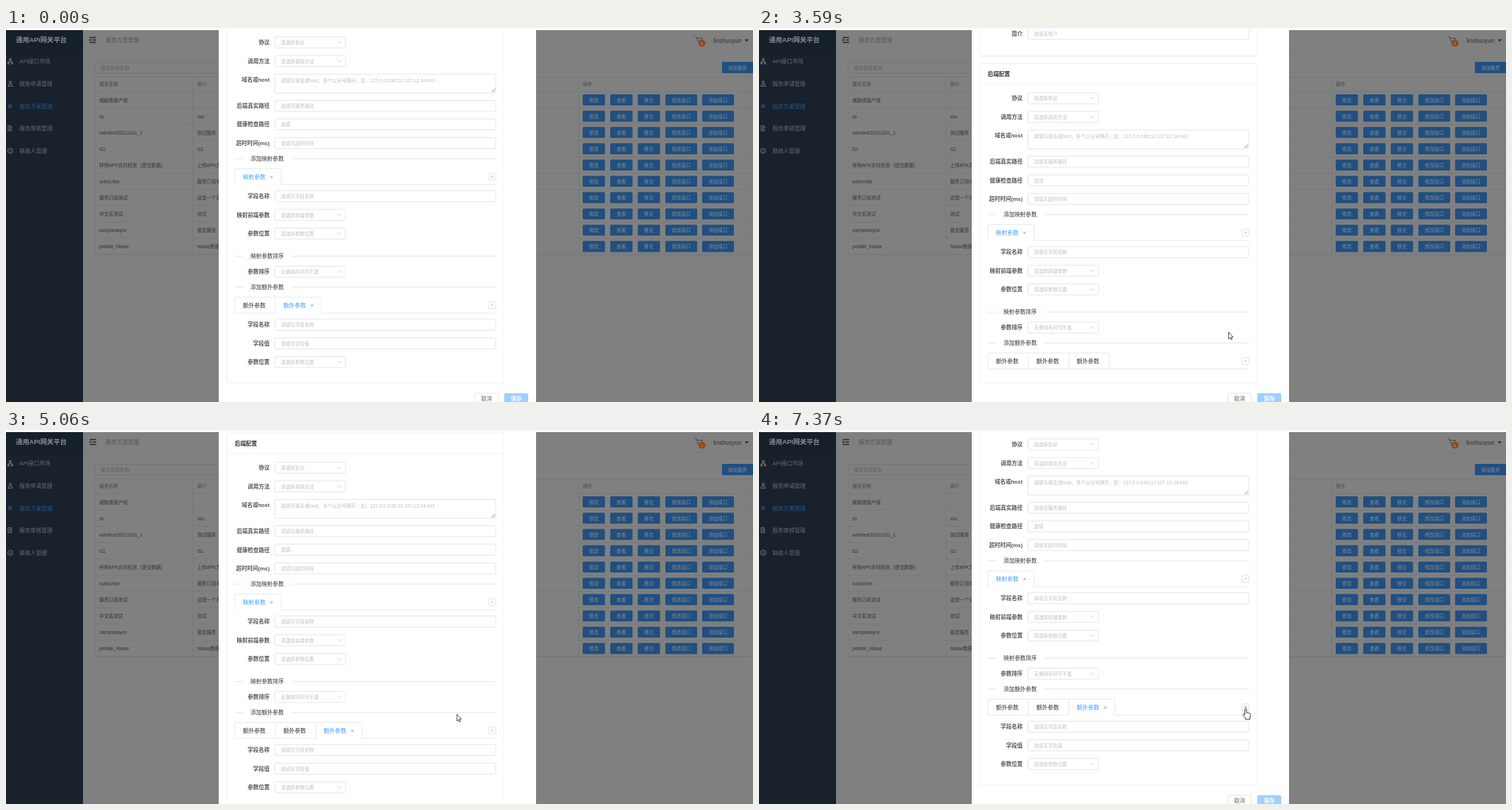
These frames come from a looping animation (1057x530 px, 8 s). An HTML page:

```html
<!DOCTYPE html>
<html lang="zh-CN">
<head>
<meta charset="utf-8">
<style>
html, body { margin: 0; width: 100%; height: 100%; overflow: hidden; background: #808080; }
svg { display: block; font-family: "Liberation Sans", "Noto Sans CJK SC", "Noto Sans CJK", sans-serif; }
</style>
</head>
<body>
<svg id="stage" width="1057" height="530" viewBox="0 0 1057 530"></svg>
<script>
const PANEL = 79.2, LOOP = 8000;
const ADD_AT = 2455, HOVER_AT = 4170, PICK_AT = 4345;
const BLUE = '#409eff', LINE = '#e4e7ed', HINT = '#b9bdc6', DIM = '#808080', DIMBLUE = '#204f80';

const rect = (x, y, w, h, fill, stroke = 'none', r = 0) =>
  `<rect x="${x}" y="${y}" width="${w}" height="${h}" rx="${r}" fill="${fill}" stroke="${stroke}" stroke-width=".8"/>`;
const text = (x, y, s, size, fill, more = '') =>
  `<text x="${x}" y="${y + size * .37}" font-size="${size}" fill="${fill}" ${more}>${s}</text>`;
const path = (d, stroke, width = .8, fill = 'none') =>
  `<path d="${d}" fill="${fill}" stroke="${stroke}" stroke-width="${width}"/>`;
const BOLD = 'font-weight="700"', MID = 'text-anchor="middle"', END = 'text-anchor="end"';

// Dimmed page behind the dialog
function sidebar() {
  const names = ['API接口市场', '服务申请管理', '服务方案管理', '服务审核管理', '联络人管理'];
  const icons = [
    'M6 44.5v2.5M3.5 50v-2.5h5V50M4.8 43.5h2.4v2H4.8zM2.5 49h2v2h-2zM7.500 49h2v2h-2z',
    'M4.500 77a1.600 1.600 0 1 0 3.200 0a1.600 1.600 0 1 0-3.200 0M3 82.500q0-3 3-3t3 3z',
    'M4 114v-5h3M5 112.500l3.500-3.500M8.500 112h-2',
    'M3 138.500h4v7H3zM4 141h2M4 143h2M8 140v2M8 144v1.500',
    'M6 170.300l3.300 1.800v3.600L6 177.500l-3.300-1.800v-3.600zM4.500 174h3'
  ];
  return rect(0, 3, 109, 527, '#18212c') + rect(0, 3, 109, 29, '#16202a') +
    text(50, 17, '通用API网关平台', 9.4, '#8b8d8f', BOLD + MID) +
    names.map((s, i) => {
      const c = i == 2 ? '#22588f' : '#666d75';
      return path(icons[i], c, 1.1) + text(19, 47.5 + i * 31.6, s, 7.8, c);
    }).join('');
}

function table() {
  const rows = [
    ['服务名称', '简介'], ['威胁情报产线', ''], ['ss', 'sss'], ['wdmtest20211101_1', '测试服务'],
    ['t11', 't11'], ['样例APK实时检测（提交数据）', '上传APK文件'], ['subscribe', '服务订阅中心'],
    ['服务订阅测试', '这是一个测试'], ['中文名测试', '测试'], ['sampleasync', '鉴定服务'], ['pebble_hbase', 'hbase数据']
  ];
  const buttons = [[816, 31.5, '修改'], [855, 31.5, '查看'], [894, 31.5, '移交'], [933, 45, '修改接口'], [985, 45, '添加接口']];
  let out = rect(126, 69.500, 929, 251.500, 'none', '#757679') + path('M264.500 69.500V321M810.500 69.500V321', '#757679') +
    text(816, 79.500, '操作', 6.700, '#484a4c');
  rows.forEach((row, i) => {
    const y = i ? 79 + i * 23.080 : 79.500;
    row.forEach((s, k) => out += text(k ? 270.500 : 132, y, s, 6.700, i ? '#303133' : '#404245'));
    out += path(`M126 ${90.300 + i * 23.080}H1055`, '#757679');
    if (i) for (const [x, w, s] of buttons)
      out += rect(x, y - 8, w, 15.600, DIMBLUE, 'none', 1.500) + text(x + w / 2, y, s, 6.700, '#8a8c8f', MID);
  });
  return out;
}

const page = rect(0, 0, 1057, 530, DIM) + sidebar() +
  path('M109 32.400H1057', '#78797b') +
  path('M118.500 13.500h9M122.500 17h5M118.500 20.500h9M120.500 15.500l-2 1.500 2 1.500', '#262626', 1.300) +
  text(141, 17.500, '服务方案管理', 7.900, '#4b545f') +
  path('M975 12.500h2l1.800 6.500h5l1.500-4.500h-7', '#3d3f42', .9) +
  '<circle cx="984.700" cy="21.500" r="5" fill="#944717"/>' + text(984.700, 21.800, '1', 6, '#aaa', MID) +
  text(1001, 17.500, 'linshuoyun', 8.300, '#303133') + path('M1045 16h6l-3 3.500z', 'none', 0, '#303133') +
  rect(126, 49, 190, 15, 'none', '#6e7073', 2) + text(134, 56.500, '服务名称查询', 6.700, '#5c5e62') +
  rect(1013, 48, 50, 16, DIMBLUE, 'none', 1.500) + text(1035, 56.300, '添加服务', 6.700, '#8a8c8f', MID) +
  table();

// Form parts
const label = (y, s) => text(373, y, s, 7.750, '#54565a', BOLD + END);
function field(y, name, hint, select) {
  return label(y, name) + rect(380.300, y - 7.800, select ? 100.300 : 312.700, 15.600, '#fff', '#dcdfe6', 2) +
    text(389, y + .3, hint, 6.700, HINT) +
    (select ? path(`M468.800 ${y - 1.300}l2.700 2.700 2.700-2.700`, '#c0c4cc') : '');
}
const divider = (y, s) => path(`M324 ${y}h11.500M404.500 ${y}H693`, '#dcdfe6') + text(346, y, s, 7.850, '#303133');
const plus = (y, c) => rect(683.400, y - 5, 9.800, 9.800, 'none', '#d3dce6', 1.500) +
  path(`M686 ${y}h4.600M688.300 ${y - 2.300}v4.600`, c, .7);

const form = rect(312.500, -60, 392, 98.700, '#fff', '#ebeef5', 2) +
  [1, 2, 3].map(i => path(`M313 ${38.700 + i}H704`, `rgba(0,0,0,${.06 - i * .015})`, 1)).join('') +
  field(8.300, '简介', '请填写简介') +
  text(323.500, 65.300, '后端配置', 7.900, '#303133', BOLD) + path('M313 80H704', '#ebeef5') +
  field(99.600, '协议', '请选择协议', 1) + field(126, '调用方法', '请选择调用方法', 1) +
  label(152.600, '域名或host') + rect(380.300, 144.600, 312.700, 26.800, '#fff', '#dcdfe6', 2) +
  text(389, 153.300, '请填写域名或host，多个以分号隔开，如：127.0.0.0:80;10.107.12.34:443', 6.700, HINT) +
  path('M687 170l5-5M689.500 170l2.500-2.500', '#777', .7) +
  field(189.400, '后端真实路径', '请填写服务路径') + field(215.800, '健康检查路径', '选填') +
  field(242.300, '超时时间(ms)', '请填写超时时间') + divider(264.400, '添加映射参数') +
  plus(290, '#c3cbd5') + field(317.600, '字段名称', '请填写字段名称') +
  field(344, '映射前端参数', '请选择前端参数', 1) + field(370.500, '参数位置', '请选择参数位置', 1) +
  divider(402.500, '映射参数排序') + field(424.500, '参数排序', '无需排序时可不选', 1) + divider(446.300, '添加额外参数');

const panel = field(499.700, '字段名称', '请填写字段名称') + field(526.100, '字段值', '请填写字段值') +
  field(552.600, '参数位置', '请选择参数位置', 1);

const footer = path('M312.500 495V503H704.500V495', '#ebeef5') +
  rect(663.500, 517.700, 33, 18, '#fff', '#dcdfe6', 2) + text(680, 525.500, '取消', 7.800, '#606266', MID) +
  rect(705, 517.500, 34, 18, '#a0cfff', 'none', 2) + text(722, 525.500, '保存', 7.800, '#fff', BOLD + MID);

// Each tab: [active 0..1, hovered 0..1]
function tabs(y, name, states) {
  const top = y - 11.500, base = y + 11.200;
  let x = 324, marks = '', edges = '', line = `M324 ${base}`;
  for (const [active, hover] of states) {
    const open = Math.max(active, hover), w = 57.200 + 7.900 * active;
    const tx = x + 11.200 - 3.850 * hover * (1 - active), cx = tx + 34.500 + 2.750 + 3.300 * open;
    const r = 1.600 * open;
    const mix = [48, 49, 51].map((v, i) => Math.round(v + ([64, 158, 255][i] - v) * open));
    marks += text(tx, y + .2, name, 8, `rgb(${mix})`);
    if (open > .05) marks += path(`M${cx - r} ${y - r + .5}l${2 * r} ${2 * r}m0 ${-2 * r}l${-2 * r} ${2 * r}`, BLUE, .8);
    if (x > 324) edges += `M${x} ${top}V${base}`;
    line += active > .5 ? `M${x + w} ${base}` : `H${x + w}`;
    x += w;
  }
  return path(`M324 ${base}V${top + 2}q0-2 2-2H${x - 2}q2 0 2 2V${base}` + edges + line + 'H693', LINE, .9) + marks;
}

// Status bar peeking in from below
const bar = rect(709, 527.300, 91, 12, '#fff', '#6aa5e0') + '<circle cx="709" cy="532.500" r="8.300" fill="#e8622c"/>' +
  path('M724 529.500h3M752 529.500h3M777 529.500h2M781 529.500h2', '#333', 1);

// Pointer stops: time, x, y
const stops = [
  [680, 778, 536], [1290, 468.500, 443], [1365, 468.500, 443], [1480, 482, 415], [1500, 482, 415],
  [2120, 686, 384.500], [2300, 688.300, 389.600], [2900, 688.300, 389.600], [2940, 688.600, 390.300],
  [3220, 688.600, 390.300], [3590, 664.500, 431], [3910, 664.500, 431], [4310, 470, 474.500],
  [4730, 470, 474.500], [5060, 638, 403], [5180, 641, 401.500], [5460, 641, 401.500], [5820, 707, 398],
  [6180, 678.500, 391], [6570, 678.500, 391], [6930, 692, 395], [7070, 692, 395], [7140, 689.500, 395],
  [7345, 689.500, 395], [7370, 688.700, 395]
];
const shapes = {
  arrow: path('M0 0V9.500L2.200 7.500L3.600 10.800L5 10.200L3.600 7H6.400Z', '#222', .8, '#fff'),
  hand: path('M-1.200 8.500V1Q-1.200-.2 0-.2T1.200 1V5.500L5.500 6.300Q7 6.700 6.800 8.500L6 12V15H-.2V13L-3.600 9.200Q-4 7.600-2.600 7.600Z', '#222', .9, '#fff'),
  beam: path('M-2-5.200h1.300L0-4.600l.7-.6H2M0-4.600V4.600M-2 5.200h1.300L0 4.600l.7.6H2', '#222', .9)
};

const clamp = u => Math.min(1, Math.max(0, u));
const ease = u => (u = clamp(u), u * u * (3 - 2 * u));
const span = (t, start, length) => ease((t - start) / length);

function pointer(t) {
  const i = stops.findIndex(k => k[0] > t);
  if (i == 0) return stops[0].slice(1);
  if (i < 0) return stops[stops.length - 1].slice(1);
  const [a, b] = [stops[i - 1], stops[i]], u = span(t, a[0], b[0] - a[0]);
  return [a[1] + (b[1] - a[1]) * u, a[2] + (b[2] - a[2]) * u];
}

const stage = document.getElementById('stage');
stage.innerHTML = `<defs><clipPath id="view"><path d="M301 3H750V530H301z"/></clipPath></defs>${page}
  ${rect(301, 3, 449, 527, '#fff')}
  <g clip-path="url(#view)"><g id="scroll">
    <path id="card" fill="none" stroke="#ebeef5" stroke-width=".8"/>${form}
    <g id="tabs"></g><g id="panel">${panel}</g><g id="footer">${footer}</g>
  </g></g>
  ${rect(0, 0, 1057, 3, '#fafbfa')}<g id="bar">${bar}</g><g id="pointer"></g>`;
const el = id => document.getElementById(id);
const show = (id, on) => el(id).setAttribute('visibility', on ? 'visible' : 'hidden');
const move = (id, x, y) => el(id).setAttribute('transform', `translate(${x} ${y})`);

function draw(t) {
  const open = t < ADD_AT || t >= PICK_AT, extra = open ? PANEL : 0;
  const scroll = t < ADD_AT ? PANEL : PANEL * span(t, 4925, 245);
  const [x, y] = pointer(t), py = y + scroll;
  const onPlus = x > 683 && x < 693.500 && Math.abs(py - 472) < 5.500;
  const onTab = t > ADD_AT && x > 438.500 && x < 500 && Math.abs(py - 472) < 11.500;
  const onField = open && x > 380 && x < 693 && (Math.abs(py - 499.700) < 8 || Math.abs(py - 526.100) < 8);

  const states = [[0, 0], [1 - span(t, ADD_AT, 300), 0]];
  if (t >= ADD_AT) states.push([span(t, PICK_AT, 300), span(t, HOVER_AT, 170)]);

  move('scroll', 0, -scroll);
  el('card').setAttribute('d', `M312.500 ${500 + extra}V50.500H704.500V${500 + extra}`);
  el('tabs').innerHTML = tabs(290, '映射参数', [[1, 0]]) + tabs(472, '额外参数', states) + plus(472, onPlus ? BLUE : '#c3cbd5');
  show('panel', open);
  move('footer', 0, extra);
  show('bar', t >= 50 && t < 1900);
  el('pointer').innerHTML = shapes[onPlus || onTab ? 'hand' : onField ? 'beam' : 'arrow'];
  move('pointer', x, y);
}

function tick() {
  draw(performance.now() % LOOP);
  requestAnimationFrame(tick);
}
tick();
</script>
</body>
</html>
```
